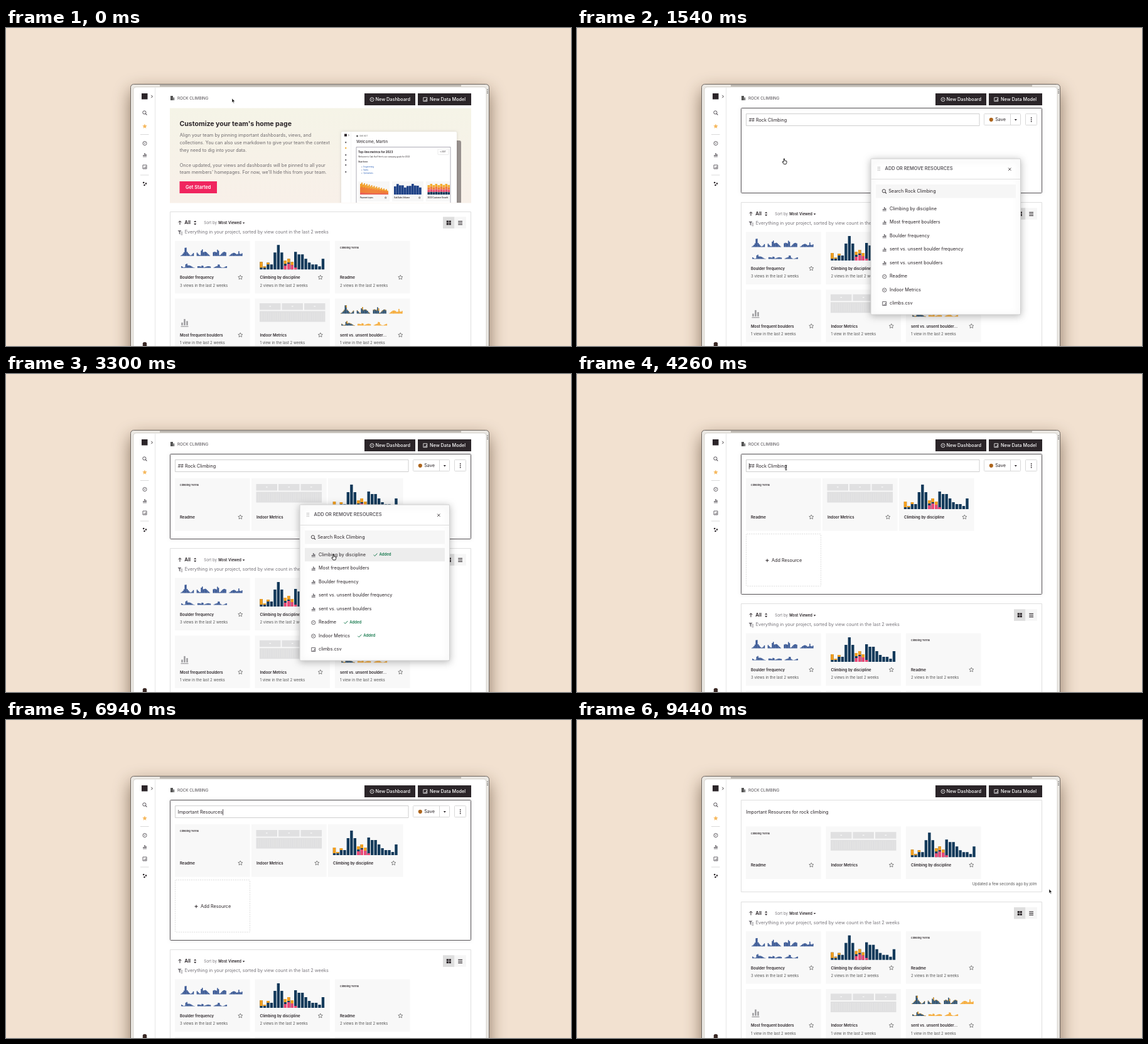
Recreate the animation shown at these times as an HTML page with a canvas. Size 900 px wide and 506 px high, loop 9460 ms.

```html
<!DOCTYPE html>
<html lang="en">
<head>
<meta charset="utf-8">
<title>Team home page</title>
<style>
html, body { margin: 0; width: 100%; height: 100%; overflow: hidden; background: #f2e1d0; }
canvas { display: block; width: 900px; height: 506px; }
</style>
</head>
<body>
<canvas id="stage" width="900" height="506"></canvas>
<script>
const c = document.getElementById('stage').getContext('2d');
const LOOP = 9460, INK = '#2b2529', SOFT = '#48434a', GRAY = '#77747a', NAVY = '#1f4287', DEEP = '#12395a',
  ORANGE = '#f5a01e', PINK = '#ea4a78';
const TITLE = 'Important Resources for rock climbing';

// Moments at which the interface changes
const OPEN = 1000, MODAL = 1520, CLOSE = 3720, SELECT = 4650, TYPE = 5600, CHAR = 70, SAVED = 8740;
const added = [['Readme', 2140], ['Indoor Metrics', 2620], ['Climbing by discipline', 3240]];
const resources = ['Climbing by discipline', 'Most frequent boulders', 'Boulder frequency',
  'sent vs. unsent boulder frequency', 'sent vs. unsent boulders', 'Readme', 'Indoor Metrics', 'climbs.csv'];
const path = [[0, 360, 112], [200, 360, 112], [880, 328, 250], [1040, 328, 250], [1430, 330, 208],
  [1560, 330, 208], [2050, 508, 394], [2180, 508, 395], [2280, 508, 401], [2480, 510, 415],
  [2660, 510, 415], [3140, 520, 288], [3280, 520, 288], [3640, 689, 223], [3780, 689, 223],
  [4220, 333, 149], [8200, 333, 149], [8540, 678, 141], [8760, 678, 141], [9340, 752, 269], [LOOP, 752, 269]];

const within = (t, a, b) => t >= a && t < b;

function rect(x, y, w, h, fill, line, r = 0, lw = 1) {
  c.beginPath();
  c.roundRect(x, y, w, h, r);
  if (fill) { c.fillStyle = fill; c.fill(); }
  if (line) { c.strokeStyle = line; c.lineWidth = lw; c.stroke(); }
}

function text(s, x, y, size = 7.27, color = INK, weight = 400, align = 'left') {
  c.font = `${weight} ${size}px Inter, "Liberation Sans", sans-serif`;
  c.textAlign = align;
  c.fillStyle = color;
  c.fillText(s, x, y);
  return c.measureText(s).width;
}

function line(points, color = INK, lw = 1) {
  c.beginPath();
  points.forEach(([x, y]) => c.lineTo(x, y));
  c.strokeStyle = color;
  c.lineWidth = lw;
  c.stroke();
}

function dot(x, y, r, fill, stroke, lw = 0.9) {
  c.beginPath();
  c.arc(x, y, r, 0, 7);
  if (fill) { c.fillStyle = fill; c.fill(); }
  if (stroke) { c.strokeStyle = stroke; c.lineWidth = lw; c.stroke(); }
}

function poly(points, fill, stroke, lw = 0.8) {
  c.beginPath();
  points.forEach(([x, y]) => c.lineTo(x, y));
  c.closePath();
  if (fill) { c.fillStyle = fill; c.fill(); }
  if (stroke) { c.strokeStyle = stroke; c.lineWidth = lw; c.stroke(); }
}

function star(x, y, r, fill, stroke) {
  const pts = [];
  for (let i = 0; i < 10; i++) {
    const a = i * Math.PI / 5 - Math.PI / 2, q = i % 2 ? r * 0.48 : r;
    pts.push([x + q * Math.cos(a), y + q * Math.sin(a)]);
  }
  poly(pts, fill, stroke);
}

const icons = {
  search(x, y, color = SOFT) {
    dot(x - 0.6, y - 0.6, 2.6, null, color);
    line([[x + 1.3, y + 1.3], [x + 3.4, y + 3.4]], color, 1.1);
  },
  dash(x, y, color = SOFT) {
    dot(x, y, 3.1, null, color, 0.8);
    line([[x - 0.5, y + 1], [x + 1, y - 1.2]], color, 0.8);
    line([[x - 1.7, y - 0.6], [x - 0.7, y - 0.6]], color, 0.7);
  },
  bars(x, y, color = SOFT, k = 1) {
    [[-2.6, 2.2], [-0.6, 5], [1.4, 3.4]].forEach(([dx, h]) =>
      rect(x + dx * k, y + (2.1 - h) * k, 1.2 * k, h * k, color));
    rect(x - 3 * k, y + 2.7 * k, 6 * k, 0.6 * k, color);
  },
  data(x, y, color = SOFT) {
    rect(x - 3, y - 3, 6, 6, null, color, 0, 0.8);
    line([[x - 1.6, y + 1.6], [x + 1.7, y + 1.6], [x + 1.7, y - 1.2]], color, 0.7);
  }
};

function minis(x, y, mixed) {
  for (let g = 0; g < 7; g++) {
    const row = g > 3 ? 1 : 0, gx = x + 9 + (g % 4) * 25.8 + row * 1.2, by = y + (row ? 43 : 24);
    const warm = mixed && (g === 3 || g > 4);
    for (let i = 0; i < 13; i++) {
      const noise = Math.abs(Math.sin(i * 12.9 + g * 5.3)) ** 1.5;
      const peak = Math.exp(-(((i - (g === 3 ? 9 : 4.5)) / 0.9) ** 2));
      const h = (0.7 + noise * 6 + peak * 9) * (row ? (g === 4 ? 0.6 : 0.42) : g === 3 ? 0.75 : 1);
      rect(gx + i * 1.65, by - h, 1.4, h, warm ? ORANGE : mixed ? DEEP : NAVY);
      if (mixed && !warm && i % 3 !== 1) rect(gx + i * 1.65, by - h, 1.4, 0.8 + peak * 4, ORANGE);
    }
  }
}

function discipline(x, base) {
  const total = [12, 5, 11, 8, 27, 39, 27, 14, 17, 12, 28, 24, 24, 17, 11, 8, 8, 5, 17];
  const warm = [9, 2, 3, 0, 0, 0, 0, 5, 6, 5];
  const pink = [0, 0, 0, 0, 0, 0, 0, 6, 9, 7, 3];
  total.forEach((h, i) => {
    const bx = x + 7.8 + i * 5.47;
    rect(bx, base - h, 4.4, h, DEEP);
    if (warm[i]) rect(bx, base - h, 4.4, warm[i], ORANGE);
    if (pink[i]) rect(bx, base - pink[i], 4.4, pink[i], PINK);
  });
}

function metrics(x, y) {
  for (let i = 0; i < 3; i++) {
    rect(x + 7.5 + i * 35.5, y + 7.5, 33.5, 10.5, '#e0e0e1');
    rect(x + 23 + i * 35.5, y + 12, 2.5, 1, '#fff');
  }
  rect(x + 7.5, y + 20, 104.5, 17, '#e0e0e1');
  for (let i = 1; i < 30; i++) rect(x + 7.5 + i * 3.5, y + 22, 0.5, 13, '#e8e8e8');
}

// drop lowers the title and the chart baseline in the pinned layout
function card(name, x, y, views, drop = 0) {
  rect(x, y, 119.5, 83.5, '#f8f8f8');
  if (name === 'Boulder frequency') minis(x, y);
  if (name === 'sent vs. unsent boulder...') minis(x, y, true);
  if (name === 'Climbing by discipline') discipline(x, y + 45.5 + drop);
  if (name === 'Indoor Metrics') metrics(x, y + drop * 0.4);
  if (name === 'Readme') text('Climbing Terms', x + 7.7, y + 10.8, 4, INK, 600);
  if (name === 'Most frequent boulders') icons.bars(x + 15.5, y + 38.5, '#99989b', 2);
  text(name, x + 8, y + 58.7 + drop, 6.05, INK, 600);
  if (views) text(`${views} view${views > 1 ? 's' : ''} in the last 2 weeks`, x + 8, y + 71, 6.03, '#555');
  star(x + 104.3, y + 58.2 + drop, 3.7, null, '#666');
}

function listPanel(y) {
  rect(261.5, Math.floor(y) + 0.5, 479, 300, '#fff', '#dfdfdf');
  line([[277, y + 21], [277, y + 15]]);
  line([[274.6, y + 17.3], [277, y + 14.9], [279.4, y + 17.3]]);
  text('All', 284.3, y + 18, 7.9, INK, 600);
  poly([[299.2, y + 17], [303.2, y + 17], [301.2, y + 14.6]], INK);
  poly([[299.2, y + 19], [303.2, y + 19], [301.2, y + 21.4]], INK);
  text('Sort by', 315.3, y + 18.3, 6.1, GRAY);
  text('Most Viewed', 338.2, y + 18.3, 5.85, INK, 600);
  poly([[376.8, y + 17.4], [380.4, y + 17.4], [378.6, y + 19.6]], INK);
  poly([[273.5, y + 30], [279.5, y + 30], [277.3, y + 32.6], [277.3, y + 36.5], [275.7, y + 35.5], [275.7, y + 32.6]], GRAY);
  [32.5, 34.5, 36.5].forEach(d => rect(278.5, y + d, 2.8, 0.8, GRAY));
  text('Everything in your project, sorted by view count in the last 2 weeks', 284.7, y + 33.2, 7.24, GRAY);
  rect(696, y + 8.5, 18.5, 18.5, '#dedede');
  rect(714.5, y + 8.5, 18.5, 18.5, '#f6f6f6');
  [[701.7, 14.5], [705.6, 14.5], [701.7, 18.3], [705.6, 18.3]].forEach(([x, d]) => rect(x, y + d, 3.2, 3.1, INK));
  [15, 17.6, 20.2].forEach(d => rect(720.2, y + d, 6.8, 1.1, INK));
  [['Boulder frequency', 3], ['Climbing by discipline', 2], ['Readme', 2],
    ['Most frequent boulders', 1], ['Indoor Metrics', 1], ['sent vs. unsent boulder...', 1]]
    .forEach(([name, views], i) => card(name, 269 + (i % 3) * 127.5, y + 46.7 + Math.floor(i / 3) * 91.7, views));
}

function preview() {
  c.save();
  c.beginPath();
  c.rect(520, 140, 221, 138);
  c.clip();
  rect(712, 179, 13, 110, '#98918e', null, 3);
  c.shadowColor = '#0002';
  c.shadowBlur = 4;
  rect(534, 165, 184, 120, '#fff', null, 2);
  c.shadowColor = 'transparent';
  rect(539, 168.5, 4, 4, INK);
  line([[545, 169], [546.5, 170.5], [545, 172]], INK, 0.5);
  line([[549.5, 165], [549.5, 278]], '#eeeeee', 0.6);
  [182, 191, 202, 210, 218, 229].forEach((y, i) => rect(540, y - 1.2, 2.4, 2.4, i === 1 ? '#f3b33d' : GRAY, null, 1));
  dot(559.5, 172, 1.4, '#555');
  text('OAK HUT', 563, 172, 2.9, '#555');
  text('Welcome, Martin', 558, 181.4, 6.3);
  rect(558, 189.5, 150, 95, '#fff', '#8b8797', 0, 0.7);
  text('Top-line metrics for 2023', 561, 197.3, 4.45, INK, 700);
  rect(688, 192.5, 17, 9, '#fff', '#ddd', 1, 0.6);
  text('✎ EDIT', 691.3, 197.2, 2.8);
  text('Welcome to Oak Hut! Here’s our company goals for 2023.', 561.3, 204.8, 3.05);
  text('Start here:', 561.3, 213.1, 3.1, INK, 600);
  ['Engineering', 'Sales', 'Operations'].forEach((s, i) => {
    dot(566.8, 221 + i * 5, 0.5, NAVY);
    text(s, 569.3, 221 + i * 5, 3, '#245bb5');
  });
  [[561, 'Payment types'], [615, 'Oak Sales Volume'], [668.5, '2023 Customer Growth']].forEach(([x, s], k) => {
    c.save();
    c.beginPath();
    c.rect(x, 244, Math.min(50, 707 - x), 32);
    c.clip();
    rect(x, 244, 50, 32, '#f7f7f7');
    for (let i = 0; i < 23; i++) {
      const bx = x + 3 + i * 1.95, n = Math.abs(Math.sin(i * 4.7));
      if (k === 0) {
        const h = 17 - i * 0.52 + n * 2.5;
        rect(bx, 265 - h, 2, h, '#f2a02b');
        rect(bx, 265 - h * 0.68, 2, h * 0.68, '#ef7b3a');
        rect(bx, 265 - h * 0.16, 2, h * 0.16, '#e85a5c');
      } else if (k === 1 && i < 11) {
        const h = 13 + Math.sin(i * 1.1) * 2 + n * 2;
        rect(x + 3 + i * 4, 265 - h, 3.7, h, NAVY);
      } else if (k === 2 && i < 11) {
        const h = 15 + n * 2;
        ['#f4ad32', '#ef7b3a', '#e94c6c', DEEP].forEach((f, j) =>
          rect(x + 3 + i * 4, 265 - h + j * h / 4, 3.6, h / 4, f));
      }
    }
    text(s, x + 3, 270.3, 2.9, INK, 600);
    star(x + 43.7, 270, 1.6, null, '#777');
    c.restore();
  });
  c.restore();
}

function banner(hover) {
  const g = c.createLinearGradient(0, 127, 0, 278);
  g.addColorStop(0, '#f5f4e7');
  g.addColorStop(1, '#f8f0e9');
  rect(261, 127.5, 480, 151, g);
  text("Customize your team's home page", 276.5, 153, 10.55, INK, 700);
  ['Align your team by pinning important dashboards, views, and',
    'collections. You can also use markdown to give your team the context',
    'they need to dig into your data.', '',
    'Once updated, your views and dashboards will be pinned to all your',
    "team members' homepages. For now, we'll hide this from your team."]
    .forEach((s, i) => text(s, 276.7, 171.2 + i * 11.8, 7.25, '#6e6a6d'));
  rect(276.5, 244, 59.5, 19, hover ? '#ee3f70' : '#f0255f');
  text('Get Started', 306.2, 253.6, 7.35, '#fff', 600, 'center');
  preview();
}

function addTile(x, y) {
  c.setLineDash([2, 1.5]);
  rect(x + 0.5, y + 0.5, 119, 83, '#fff', '#d5d5d5', 1, 0.8);
  c.setLineDash([]);
  line([[x + 31.5, y + 42.7], [x + 36.5, y + 42.7]]);
  line([[x + 34, y + 40.2], [x + 34, y + 45.2]]);
  text('Add Resource', x + 41, y + 42.8);
}

function editor(t, pinned, bottom, hoverSave) {
  c.shadowColor = '#0002';
  c.shadowBlur = 5;
  rect(261.5, 127.5, 479, bottom - 127.5, '#fff', null, 1);
  c.shadowColor = 'transparent';
  rect(261.5, 127.5, 479, bottom - 127.5, null, '#5a565a', 1);
  rect(269.5, 136.5, 371.5, 19, '#fff', '#cfcfcf');
  const typed = Math.floor((t - TYPE) / CHAR);
  const value = t < TYPE ? '## Rock Climbing' : TITLE.slice(0, typed);
  if (within(t, SELECT, TYPE)) rect(273.5, 141, 61.5, 11, '#b4d5fb');
  const w = text(value, 273.7, 146.7);
  const caret = within(t, 4200, SELECT) ? 274 : within(t, TYPE, 8350) ? 274 + w : 0;
  if (caret) line([[caret + 0.3, 142], [caret + 0.3, 151.5]], INK, 0.8);
  rect(648.5, 136.5, 58, 18, '#fff', '#d8d8d8', 1);
  if (hoverSave) rect(649, 137, 41.5, 17.5, '#ebebeb');
  line([[690.5, 136.5], [690.5, 154.5]], '#d8d8d8');
  dot(659.8, 145.8, 3.1, '#ad651d');
  text('Save', 666.2, 146);
  poly([[696.8, 145.1], [700.8, 145.1], [698.8, 147.5]], INK);
  rect(714.5, 136.5, 18, 18, '#fff', '#d8d8d8', 1);
  [142.9, 145.8, 148.7].forEach(y => dot(723.7, y, 0.9, INK));
  pinned.forEach(([name], i) => card(name, 269 + i * 122, 166, 0, 3.5));
}

function modal(t, mx, my) {
  c.shadowColor = '#0004';
  c.shadowBlur = 12;
  c.shadowOffsetY = 2;
  rect(468, 208, 238.5, 248, '#fff', '#d0d0d0', 1.5);
  c.shadowColor = 'transparent';
  c.shadowOffsetY = 0;
  for (let i = 0; i < 6; i++) dot(479.7 + (i % 2) * 2.4, 221.4 + Math.floor(i / 2) * 2.6, 0.7, '#999');
  text('ADD OR REMOVE RESOURCES', 490.6, 224.2, 7.37, '#5d5a5f', 600);
  line([[687.2, 222.6], [691.4, 226.8]], INK, 0.9);
  line([[691.4, 222.6], [687.2, 226.8]], INK, 0.9);
  line([[468, 240.5], [706.5, 240.5]], '#dddddd');
  rect(476, 249, 223, 21.5, '#f6f6f6');
  icons.search(489.5, 260, INK);
  text('Search Rock Climbing', 496.2, 260);
  const hot = within(mx, 476, 699) ? Math.floor((my - 276.5) / 21.5) : -1;
  resources.forEach((name, i) => {
    const y = 287.5 + i * 21.5;
    if (i === hot) rect(476, y - 10.7, 223, 21.5, '#ededed');
    icons[i < 5 ? 'bars' : i < 7 ? 'dash' : 'data'](489.7, y + 0.5);
    const w = text(name, 498, y);
    if (added.some(([n, at]) => n === name && t >= at)) {
      const x = 510 + w;
      line([[x + 0.5, y + 0.3], [x + 2.4, y + 2.2], [x + 6.3, y - 2]], '#16794d', 1);
      text('Added', x + 9.3, y + 0.2, 6, '#16794d', 600);
    }
  });
}

function chrome() {
  rect(0, 0, 900, 506, '#f2e1d0');
  c.shadowColor = '#41281399';
  c.shadowBlur = 28;
  c.shadowOffsetY = 10;
  rect(198.5, 89.5, 571, 450, '#eae7e2', null, 5);
  c.shadowColor = 'transparent';
  c.shadowOffsetY = 0;
  rect(198.5, 89.5, 571, 450, null, '#6d655f', 5);
  rect(245, 90.5, 480, 2.5, '#b5b0a9');
  rect(203, 94, 562, 440, '#fff', '#cbc7c1', 4, 0.7);
  [98, 100.7, 103.4].forEach(y => dot(767, y, 0.8, '#555'));
  line([[237.5, 94.5], [237.5, 506]], '#e6e6e6');
  rect(216, 104, 9.5, 9.5, INK);
  line([[231.3, 106.8], [233.4, 109], [231.3, 111.2]], INK, 0.9);
  icons.search(221, 135);
  star(221, 156.5, 3.9, '#f6b95f');
  rect(214, 169, 13.5, 1, '#dadada');
  icons.dash(221, 183.5);
  icons.bars(221, 202);
  icons.data(221, 221);
  rect(214, 233.5, 13.5, 1, '#dadada');
  [[219.2, 246], [223, 247.5], [220.5, 250]].forEach(([x, y]) => dot(x, y, 1.3, INK));
  dot(221, 503, 3.3, '#3a2925');
  rect(217, 505, 8, 5, '#3a2925', null, 2);
  rect(262, 108, 4, 7, '#555');
  rect(266.5, 110.5, 1.6, 4.5, '#555');
  text('ROCK CLIMBING', 273, 111.8, 6.2, '#4f4b50');
  rect(571, 104, 81, 19, INK);
  rect(656, 104, 85, 19, INK);
  icons.dash(583, 113.7, '#fff');
  icons.data(667.8, 113.7, '#fff');
  text('New Dashboard', 588.5, 113.7, 7.28, '#fff', 500);
  text('New Data Model', 675, 113.7, 7.28, '#fff', 500);
}

function pointerAt(t) {
  const i = Math.max(1, path.findIndex(p => p[0] > t));
  const [t0, x0, y0] = path[i - 1], [t1, x1, y1] = path[i];
  const p = (t - t0) / (t1 - t0), e = p * p * (3 - 2 * p);
  return [x0 + (x1 - x0) * e, y0 + (y1 - y0) * e];
}

function pointer(t, x, y) {
  if (within(t, 5000, 8200)) return;
  const hand = [[820, 1040], [1370, 1560], [1950, 3330], [3600, 3780], [8460, 8800]].some(([a, b]) => within(t, a, b));
  if (within(t, 4120, 8260)) {
    line([[x, y - 3.5], [x, y + 3.5]], '#111', 0.9);
    [-3.7, 3.7].forEach(d => line([[x - 1.5, y + d], [x + 1.5, y + d]], '#111', 0.8));
  } else if (hand) {
    poly([[x - 0.7, y], [x + 0.6, y], [x + 0.8, y + 3], [x + 4, y + 3.8], [x + 4, y + 6.2], [x + 3, y + 8.6],
      [x - 0.6, y + 8.6], [x - 3, y + 5], [x - 2.2, y + 4.3], [x - 0.8, y + 5.4]], '#fff', '#111', 0.9);
  } else {
    poly([[x, y], [x, y + 6.6], [x + 1.5, y + 5.3], [x + 2.5, y + 7.7], [x + 3.5, y + 7.2],
      [x + 2.5, y + 4.9], [x + 4.5, y + 4.8]], '#111', '#fff', 0.5);
  }
}

function draw(t) {
  const [x, y] = pointerAt(t);
  chrome();
  if (t < OPEN) {
    banner(t > 780);
    listPanel(292);
  } else if (t < SAVED) {
    const pinned = added.filter(([, at]) => t >= at);
    const bottom = t < CLOSE ? 262.5 : 350.5;
    editor(t, pinned, bottom, within(t, 8470, SAVED));
    if (t < MODAL) addTile(269, 166);
    if (t >= CLOSE) addTile(269, 254);
    listPanel(bottom + 15.3);
    if (within(t, MODAL, CLOSE)) modal(t, x, y);
  } else {
    rect(261.5, 127.5, 479, 146, '#fff', '#dfdfdf');
    text(TITLE, 269.3, 146.4);
    added.forEach(([name], i) => card(name, 269 + i * 127.5, 169.5, 0, 3.2));
    text('Updated a few seconds ago by jolm', 732.5, 261.2, 6.1, '#555', 400, 'right');
    listPanel(289.5);
  }
  pointer(t, x, y);
}

c.textBaseline = 'middle';
const start = performance.now();
function frame() {
  draw((performance.now() - start) % LOOP);
  requestAnimationFrame(frame);
}
frame();
</script>
</body>
</html>
```
